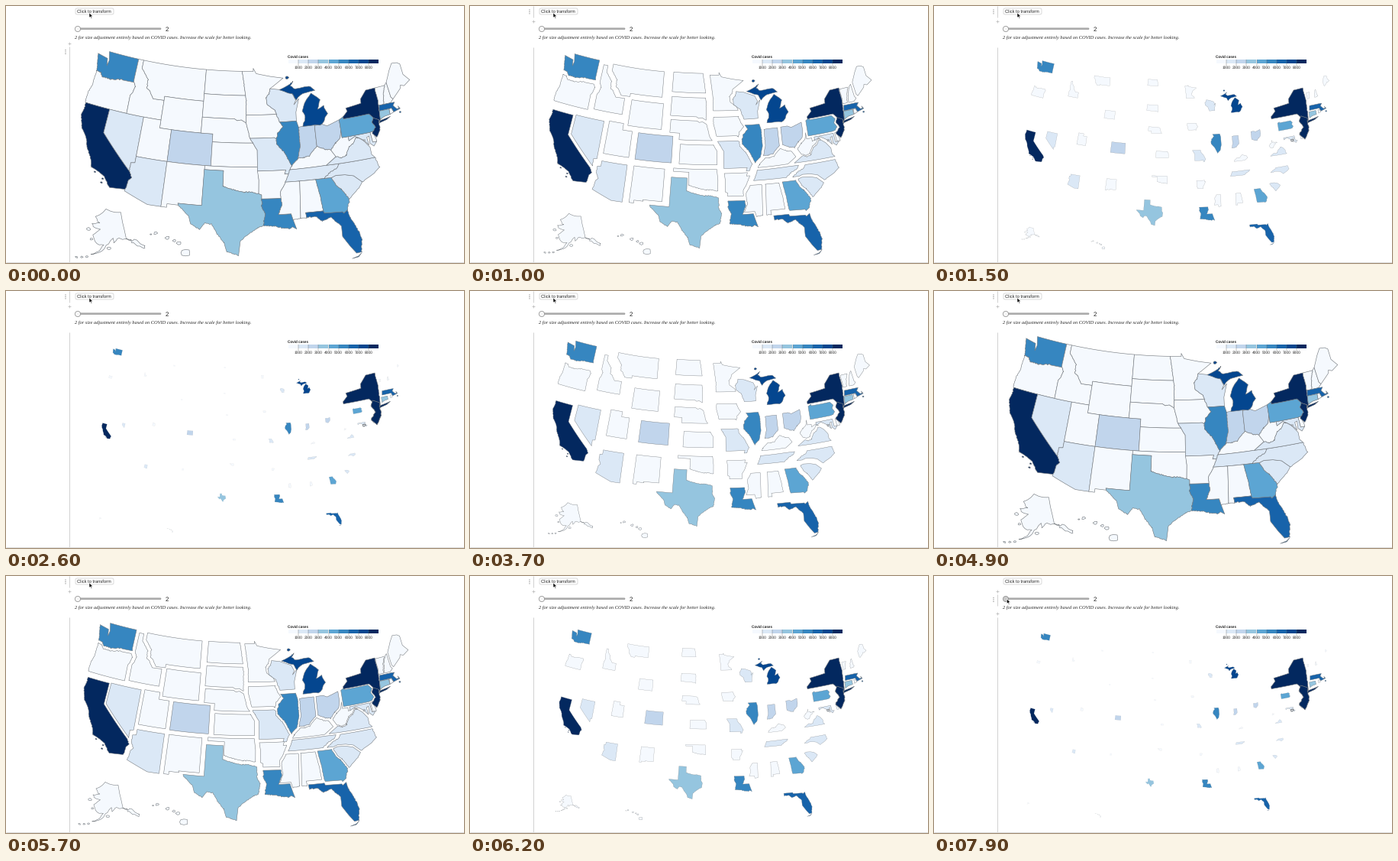
A matplotlib script for the animation above (8000 ms loop, 600 px wide and 336 px high).

```python
import numpy as np
import matplotlib.pyplot as plt
from matplotlib.animation import FuncAnimation
from matplotlib.patches import Circle, FancyBboxPatch, PathPatch, Polygon, Rectangle
from matplotlib.path import Path

W, H, DPI = 600, 336, 100
FRAMES, STEP = 80, 100
PT = 72 / DPI
BLUES = ["#f5f9fe", "#dbe8f6", "#c1d5ec", "#95c5df", "#5ca5d3",
         "#3686c0", "#1763aa", "#04468f", "#03285f"]
rng = np.random.default_rng(4)

plt.rcParams["text.hinting"] = "none"
fig = plt.figure(figsize=(W / DPI, H / DPI), dpi=DPI, facecolor="white")
ax = fig.add_axes([0, 0, 1, 1])
ax.set_xlim(0, W)
ax.set_ylim(H, 0)
ax.axis("off")


def albers(lon0, p1, p2, k, ref, at):
    """Equal-area conic in degrees west / north; ref lands on pixel at."""
    s1, s2 = np.sin(np.radians([p1, p2]))
    n = (s1 + s2) / 2
    c = 1 - s1 * s1 + 2 * n * s1

    def raw(pts):
        west, north = np.asarray(pts, float).T
        rho = np.sqrt(c - 2 * n * np.sin(np.radians(north))) / n
        theta = n * np.radians(lon0 - west)
        return k * np.column_stack([rho * np.sin(theta), rho * np.cos(theta)])

    shift = np.array(at) - raw([ref])[0]
    return lambda pts: raw(pts) + shift


K = 596
MAIN = albers(96, 29.5, 45.5, K, (96.6, 38.7), (313.2, 192.8))
ALASKA = albers(154, 55, 65, 0.35 * K, (156, 58.5), (130.2, 312.6))
HAWAII = albers(157, 8, 18, K, (160, 19.9), (191, 319.2))


# Outline helpers: all points are degrees west, degrees north
LON, LAT = 0, 1


def border(axis, *nums, rough=0.04):
    """A ragged line that runs along one axis; call it to cut out a stretch."""
    p = np.reshape(nums, (-1, 2))
    p = p[p[:, axis].argsort()]
    key, val = p[:, axis], p[:, 1 - axis]
    grid = np.union1d(key, np.arange(key[0], key[-1], 0.15))
    vals = np.interp(grid, key, val) + rng.normal(0, rough, len(grid))

    def cut(a, b):
        lo, hi = min(a, b), max(a, b)
        k = np.concatenate([[lo], grid[(grid > lo) & (grid < hi)], [hi]])
        pts = np.empty((len(k), 2))
        pts[:, axis], pts[:, 1 - axis] = k, np.interp(k, grid, vals)
        return pts if a <= b else pts[::-1]

    return cut


def ring(*parts):
    """Close a ring, with long edges split so that they follow the parallels."""
    p = np.vstack([np.reshape(part, (-1, 2)) for part in parts])
    out = []
    for a, b in zip(p, np.roll(p, -1, axis=0)):
        n = 1 + int(np.hypot(*(b - a)) / 1.2)
        out.append(a + (b - a) * np.arange(n)[:, None] / n)
    return np.vstack(out + [p[:1]])


def coast(*nums, rough=0.06):
    p = np.reshape(nums, (-1, 2))
    f = np.arange(3)[:, None] / 3
    pts = np.vstack([a + (b - a) * f for a, b in zip(p, np.roll(p, -1, axis=0))])
    return ring(pts + rng.normal(0, rough, pts.shape))


def box(west, east, north, south):
    return ring((west, north, east, north, east, south, west, south))


def island(west, north, r):
    a = np.radians(np.arange(0, 360, 45))
    size = r * rng.uniform(0.7, 1.2, len(a))
    return ring(np.column_stack([west + size * np.cos(a) / np.cos(np.radians(north)),
                                 north + 0.7 * size * np.sin(a)]))


states = []


def state(cases, *rings, proj=MAIN, at=None):
    """Add a region; thousands of cases set its colour and, per area, its shrunk size."""
    loops = [proj(r) for r in rings]
    area = sum(abs(np.sum(x[:-1] * y[1:] - x[1:] * y[:-1])) / 2 for x, y in (v.T for v in loops))
    codes = []
    for v in loops:
        codes += [Path.MOVETO] + [Path.LINETO] * (len(v) - 2) + [Path.CLOSEPOLY]
    verts = np.vstack(loops)
    mid = np.array(at) if at else (verts.min(0) + verts.max(0)) / 2
    patch = PathPatch(Path(verts, codes), fc=BLUES[min(int(cases), 8)], ec="#74797e",
                      joinstyle="round")
    ax.add_patch(patch)
    states.append((patch, verts, codes, mid, cases / area))
    return cases / area


# Coasts, rivers and ridges shared by neighbours
PACIFIC = border(LAT, 117.12, 32.53, 118.3, 33.75, 119.1, 34.1, 120.55, 34.5, 120.9, 35.4,
                 121.9, 36.6, 122.5, 37.8, 123.7, 38.95, 124.35, 40.4, 124.15, 41.5,
                 124.45, 42.8, 124.05, 44.5, 124.0, 46.25, 124.7, 48.38)
ATLANTIC = border(LAT, 80.4, 25.2, 80.03, 26.8, 80.55, 28.4, 81.3, 29.9, 81.45, 30.72,
                  80.9, 32.05, 79.2, 33.2, 78.55, 33.86, 76.6, 34.6, 75.5, 35.25,
                  75.87, 36.55, 75.05, 38.45, 74.85, 39, 74.1, 39.75, 74, 40.5)
GULF = border(LON, 97.4, 26, 97.2, 27.7, 96.4, 28.4, 94.7, 29.4, 93.8, 29.7, 92.3, 29.55,
              90.2, 29.1, 89.6, 29.4, 89.5, 30.2, 88.4, 30.35, 86.2, 30.4, 85.3, 29.7,
              84, 30.1, 83, 29.15)
RIO_GRANDE = border(LON, 106.55, 31.8, 104.9, 30.6, 104.4, 29.6, 103.15, 29, 102.4, 29.85,
                    101.4, 29.77, 100.3, 28.3, 99.5, 27.5, 99.1, 26.4, 97.4, 25.87)
RED = border(LON, 100, 34.56, 98.1, 34.13, 96.6, 33.85, 95.5, 33.9, 94.04, 33.55)
SABINE = border(LAT, 94.04, 33.02, 94.04, 32, 93.55, 31.2, 93.85, 29.7)
MISSISSIPPI = border(LAT, 92.1, 46.75, 92.3, 46.1, 92.87, 45.6, 92.75, 44.75, 91.3, 44,
                     91.2, 43.5, 90.65, 42.5, 90.15, 41.9, 91.05, 41.2, 91.42, 40.4,
                     91.4, 39.8, 90.2, 38.7, 89.15, 37, 89.5, 36.5, 90.25, 35,
                     91.1, 33.9, 91.15, 33, 91, 32.3, 91.6, 31)
OHIO = border(LON, 89.15, 37, 88.05, 37.85, 87.1, 37.85, 86.2, 38, 85.4, 38.7, 84.82, 39.1,
              83.7, 38.65, 82.6, 38.4, 81.7, 39.2, 80.85, 39.7, 80.52, 40.64)
WABASH = border(LAT, 87.53, 41.7, 87.53, 39.3, 88.05, 37.85, rough=0.02)
PLAINS = border(LAT, 97.23, 49, 96.8, 47, 96.45, 45.3, 96.45, 42.5, 95.8, 40.58, 95.3, 40,
                94.6, 39.1, rough=0.02)
COLUMBIA = border(LON, 124.05, 46.25, 123.2, 46.15, 122.8, 45.7, 121.2, 45.67, 119, 46)
SNAKE = border(LAT, 116.92, 46, 116.5, 45.5, 117.03, 44.3)
BITTERROOT = border(LAT, 116.05, 48, 114.5, 46.7, 114.45, 45.6, 113.9, 45.4, 113, 44.45)
COLORADO = border(LAT, 114.7, 36.1, 114.63, 35, 114.1, 34.3, 114.5, 33.9, 114.72, 32.72)
BLUE_RIDGE = border(LON, 81.97, 37.53, 81.2, 37.25, 80.3, 37.5, 79.6, 38.5, 78.9, 38.8,
                    78.35, 39.4, 77.75, 39.3)
SMOKIES = border(LON, 84.3, 35, 83.1, 35.75, 82, 36.1, 81.68, 36.59)
SAVANNAH = border(LAT, 83.1, 35, 82.6, 34, 81.9, 33.4, 80.9, 32.05)
CHATTAHOOCHEE = border(LAT, 85.6, 35, 85.18, 32.87, 85, 31, rough=0.01)
DELAWARE = border(LAT, 75.35, 42, 74.7, 41.36, 75.1, 40.9, 74.75, 40.2, 75.5, 39.6,
                  74.9, 38.95)
HUDSON = border(LAT, 73.35, 45, 73.3, 43.6, 73.5, 42.05, 73.65, 41, rough=0.02)
CONNECTICUT = border(LAT, 71.5, 45, 72.05, 44.1, 72.45, 42.73)

# West
state(5.6, ring(PACIFIC(46.25, 48.38), (123.1, 48.15, 122.75, 48.1, 122.5, 47.2, 122.35, 47.9),
                (122.75, 49, 117.03, 49, 117.04, 46.4, 116.92, 46), COLUMBIA(119, 124.05)))
state(0.8, ring(COLUMBIA(124.05, 119), SNAKE(46, 44.3), (117.03, 42), PACIFIC(42, 46.25)))
state(8.4, ring((120, 42, 120, 39), COLORADO(35, 32.72), PACIFIC(32.53, 42)),
      island(119.8, 34, 0.12), island(118.4, 33.4, 0.12), island(118.45, 32.9, 0.12))
state(1.1, ring((120, 42, 114.04, 42, 114.04, 36.2), COLORADO(36.1, 35), (120, 39)))
state(0.5, ring((117.03, 49, 116.05, 49), BITTERROOT(48, 44.45),
                (111.05, 44.5, 111.05, 42, 117.03, 42), SNAKE(44.3, 46), (117.04, 46.4)))
state(0.2, ring((116.05, 49, 104.05, 49, 104.05, 45, 111.05, 45, 111.05, 44.5),
                BITTERROOT(44.45, 48)))
state(0.15, box(111.05, 104.05, 45, 41))
state(0.8, ring((114.04, 42, 111.05, 42, 111.05, 41, 109.05, 41, 109.05, 37, 114.04, 37)))
state(2.9, box(109.05, 102.05, 41, 37))
state(1.2, ring((114.04, 37, 109.05, 37, 109.05, 31.33, 111.07, 31.33, 114.8, 32.5),
                COLORADO(32.72, 36.1), (114.04, 36.2)))
state(0.3, ring((109.05, 37, 103, 37, 103.05, 32, 106.6, 32, 106.5, 31.78),
                (108.2, 31.78, 108.2, 31.33, 109.05, 31.33)))
# Plains
state(0.15, ring((104.05, 45.94, 104.05, 49), PLAINS(49, 45.94)))
state(0.15, ring((104.05, 45.94), PLAINS(45.94, 42.5),
                 (97.3, 42.87, 98, 42.77, 98.5, 43, 104.05, 43)))
state(0.2, ring((104.05, 43, 98.5, 43, 98, 42.77, 97.3, 42.87), PLAINS(42.5, 40),
                (102.05, 40, 102.05, 41, 104.05, 41)))
state(0.4, ring((102.05, 40), PLAINS(40, 39.1), (94.62, 37, 102.05, 37)))
state(0.6, ring((103, 37, 94.62, 37, 94.43, 35.4), RED(94.48, 100), (100, 36.5, 103, 36.5)))
state(3.7, ring((103.04, 36.5, 100, 36.5), RED(100, 94.04), SABINE(33.02, 29.7),
                GULF(93.85, 97.4), RIO_GRANDE(97.4, 106.55), (106.6, 32, 103.05, 32)))
state(0.6, ring(PLAINS(43.5, 49), (95.15, 49, 95.15, 49.38, 94.6, 48.7, 92, 48.3, 89.6, 48),
                MISSISSIPPI(46.75, 43.5)))
state(0.5, ring(MISSISSIPPI(43.5, 40.4), (91.73, 40.6), PLAINS(40.58, 43.5)))
state(1.5, ring(MISSISSIPPI(40.4, 36), (90.37, 36, 90.15, 36.5, 94.62, 36.5),
                PLAINS(39.1, 40.58), (91.73, 40.6)))
state(0.5, ring((94.62, 36.5, 90.15, 36.5, 90.37, 36), MISSISSIPPI(36, 33), (94.04, 33.02),
                RED(94.04, 94.48), (94.43, 35.4)))
state(5.9, ring((94.04, 33.02), MISSISSIPPI(33, 31), (89.75, 31, 89.5, 30.2, 89.1, 29.05),
                GULF(89.65, 93.85), SABINE(29.7, 33.02)))
# Great Lakes
state(1.5, ring(MISSISSIPPI(42.5, 46.75), (90.4, 46.57, 88.1, 45.9, 87.6, 45.1, 88, 44.55),
                (87.05, 45.25, 87.75, 43.6, 87.8, 42.5)))
state(6 - 0.1, ring((90.65, 42.5, 87.8, 42.5), WABASH(41.7, 37.85), OHIO(88.05, 89.15),
                    MISSISSIPPI(37, 42.5)))
state(2.2, ring((87.53, 41.7, 86.8, 41.76, 84.8, 41.76), OHIO(84.82, 88.05),
                WABASH(37.85, 41.7)))
state(2.2, ring((84.8, 41.7, 83.45, 41.73, 82.7, 41.45, 80.52, 41.98), OHIO(80.52, 84.82)))
state(7.6, coast(84.8, 41.76, 83.45, 41.73, 82.45, 43, 82.8, 44.05, 83.9, 43.65, 83.3, 44.8,
                 84.7, 45.75, 86.1, 44.7, 86.5, 43.6, 86.25, 42.9, 86.8, 41.76, rough=0.04),
      coast(90.4, 46.57, 88.4, 47.2, 87.8, 47.45, 88.4, 46.9, 87.5, 46.5, 85, 46.75,
            84, 46.1, 86.3, 45.9, 87.5, 45.2, 88.1, 45.9, rough=0.04),
      island(88.85, 48, 0.25))
# South
state(0.5, ring(MISSISSIPPI(36.5, 37), OHIO(89.15, 82.6), (81.97, 37.53, 83.68, 36.6)))
state(1.9, ring((89.5, 36.5, 83.68, 36.6), SMOKIES(81.68, 84.3), MISSISSIPPI(35, 36.5)))
state(0.9, ring(MISSISSIPPI(35, 31), (89.75, 31), GULF(89.5, 88.4), (88.1, 34.9, 88.2, 35)))
state(0.9, ring((88.2, 35), CHATTAHOOCHEE(35, 31), (87.6, 31), GULF(87.5, 88.4), (88.1, 34.9)))
state(4.4, ring((85.6, 35), SAVANNAH(35, 32.05), ATLANTIC(32.05, 30.72),
                (82.05, 30.36, 82.2, 30.57, 84.86, 30.7), CHATTAHOOCHEE(31, 35)))
state(6.7, ring((87.6, 31, 85, 31, 84.86, 30.7, 82.2, 30.57, 82.05, 30.36),
                ATLANTIC(30.72, 25.2), (81.1, 25.15, 81.8, 26.1, 82.7, 27.5, 82.65, 28.8),
                GULF(83, 87.5)),
      ring((80.4, 25.1, 80.9, 24.75, 81.8, 24.55, 80.9, 24.65)))
state(1.1, ring((83.1, 35, 82.4, 35.2, 81, 35.1, 79.7, 34.8), ATLANTIC(33.86, 32.05),
                SAVANNAH(32.05, 35)))
state(1.4, ring(SMOKIES(84.3, 81.68), ATLANTIC(36.55, 33.86),
                (79.7, 34.8, 81, 35.1, 82.4, 35.2, 83.1, 35)))
state(1.3, ring((83.68, 36.6), BLUE_RIDGE(81.97, 77.75),
                (77.05, 38.8, 76.3, 37.9, 76.3, 37, 75.87, 36.55)))
state(0.2, ring(OHIO(82.6, 80.52), (80.52, 39.72, 79.48, 39.72, 79.48, 39.2, 78.4, 39.6),
                BLUE_RIDGE(77.75, 81.97)))
state(1.7, ring((79.48, 39.72, 75.79, 39.72, 75.7, 38.46, 75.05, 38.45, 75.65, 37.95),
                (76.2, 38.4, 76.1, 39.3, 76.5, 39.2, 76.4, 38.2, 77.05, 38.9),
                (77.75, 39.3, 78.4, 39.6, 79.48, 39.2)))
state(0.3, ring((75.79, 39.72, 75.4, 39.8, 75.05, 38.75, 75.05, 38.45, 75.7, 38.46)))
# Northeast
state(4.9, ring((80.52, 41.98, 79.76, 42.27, 79.76, 42), DELAWARE(42, 39.8),
                (75.79, 39.72, 80.52, 39.72)))
NEW_YORK = state(75.8, ring((79.76, 42, 79.76, 42.27, 78.9, 42.85, 79.05, 43.27, 76.3, 43.5),
                            (76.2, 44.05, 75, 44.98), HUDSON(45, 41),
                            (73.95, 40.7, 73.9, 41), DELAWARE(41.36, 42)),
                 ring((74, 40.6, 73.7, 40.87, 72.6, 40.98, 71.9, 41.07, 72.6, 40.8)))
state(18.7, ring(DELAWARE(41.36, 38.95), ATLANTIC(39, 40.5), (74.05, 40.65, 73.9, 41)))
state(0.3, ring(HUDSON(42.75, 45), CONNECTICUT(45, 42.73)))
state(0.4, ring(CONNECTICUT(42.73, 45), (71.1, 45.3, 70.98, 43.4, 70.7, 43.08, 71.3, 42.7)))
state(0.3, ring((71.1, 45.3, 70, 46.7, 69.25, 47.45, 68.3, 47.35, 67.8, 47.07, 67.8, 45.7),
                (66.95, 44.8, 68.2, 44.3, 68.8, 44.5, 69, 44.1, 70.7, 43.08, 70.98, 43.4)))
state(6.6, ring((73.5, 42.05, 73.27, 42.75, 71.3, 42.7, 70.6, 42.65, 71, 42.3, 70.5, 41.77),
                (70.1, 41.78, 70.2, 42.08, 69.95, 41.7, 71.15, 41.5, 71.38, 42.02)),
      island(70.1, 41.28, 0.12))
state(0.5, ring((71.8, 42.01, 71.38, 42.02, 71.15, 41.5, 71.85, 41.32)))
state(3.1, ring((73.5, 42.05, 71.8, 42.01, 71.85, 41.32, 72.9, 41.25, 73.65, 41)))
state(0.5, island(77.02, 38.9, 0.12))
# Alaska and Hawaii
state(0.13, coast(141, 69.65, 141, 60.3, 137.5, 58.9, 135.5, 59.6, 130, 55.9, 131, 55,
                  136.5, 58.1, 139, 59.5, 146, 60.8, 150, 59.5, 150.5, 61.2, 153.8, 59.2,
                  158, 56.4, 164.8, 54.5, 160, 56.2, 157.2, 58.6, 162, 58.7, 166, 61.6,
                  161, 64, 166.2, 64.5, 168, 65.6, 161.9, 66.4, 166.4, 68.3, 156.6, 71.3,
                  rough=0.2),
      island(153.4, 57.4, 0.8), island(170.2, 63.4, 0.7), island(166.4, 60.1, 0.5),
      *[island(167 + 3 * i, 53.6 - 0.5 * i, 0.45) for i in range(3)],
      proj=ALASKA, at=(123, 297))
state(0.22, island(155.5, 19.6, 0.65), island(156.4, 20.8, 0.3), island(157, 21.12, 0.2),
      island(157.95, 21.47, 0.28), island(159.53, 22.05, 0.23), island(160.15, 21.9, 0.1),
      proj=HAWAII, at=(215, 313))


def label(x, y, s, px, ha="left", family="Liberation Sans", color="#222", **kw):
    return ax.text(x, y, s, fontsize=px * PT, ha=ha, va="baseline",
                   family=family, color=color, **kw)


def line(x, y, color, px):
    return ax.plot(x, y, color=color, lw=px * PT, solid_capstyle="butt")[0]


# Legend
label(369, 67.8, "Covid cases", 4.65, weight="bold")
BLOCK = 13.2
for i, color in enumerate(BLUES):
    x = 369.7 + i * BLOCK
    ax.add_patch(Rectangle((x, 70.4), BLOCK, 5, fc=color, lw=0))
    if i:
        line([x, x], [70.4, 78], "#666", 0.4)
        label(x, 82.3, f"{i}000", 4.9, ha="center")

# Controls
ax.add_patch(FancyBboxPatch((91, 3), 50, 8, boxstyle="round,pad=0,rounding_size=2",
                            fc="white", ec="#c4c4c4", lw=0.6 * PT))
label(115.7, 9, "Click to transform", 5.8, ha="center")
ax.add_patch(FancyBboxPatch((92, 28.9), 111, 1.6, boxstyle="round,pad=0,rounding_size=0.8",
                            fc="#b5b5b5", ec="#8a8a8a", lw=0.6 * PT))
thumb = ax.add_patch(Circle((94, 30), 3.6, ec="#888", lw=0.7 * PT, zorder=4))
label(208.7, 33, "2", 8)
label(89.7, 42.7, "2 for size adjustment entirely based on COVID cases. "
      "Increase the scale for better looking.", 6.38, family="Liberation Serif", style="italic")

# Notebook margin
MARGIN = 82.5
line([MARGIN] * 2, [54, H], "#d2d2d2", 1)
line([0, W], [335.3, 335.3], "#dcdcdc", 1)
hover = line([MARGIN] * 2, [0, 0], "#d2d2d2", 1)


def plus(y):
    return [line([80.8, 85.2], [y, y], "#aaa", 0.6), line([83, 83], [y - 2.2, y + 2.2], "#aaa", 0.6)]


plus_top, plus_low = plus(20), plus(49)
dots = [ax.add_patch(Circle((78, 0), 0.6, fc="#777", lw=0)) for _ in range(3)]

ARROW = np.array([(0, 0), (0, 6.6), (1.6, 5.2), (2.7, 7.6), (3.7, 7.2), (2.6, 4.8), (4.8, 4.7)])
cursor = ax.add_patch(Polygon(ARROW, fc="black", ec="white", lw=0.6 * PT, zorder=6))


def ease(t, start, length=2000):
    u = np.clip((t - start) / length, 0, 1)
    return 4 * u ** 3 if u < 0.5 else 1 - 4 * (1 - u) ** 3


def draw(frame):
    t = frame * STEP
    shrunk = ease(t, 270) - ease(t, 2605) + ease(t, 5060)
    for patch, verts, codes, mid, density in states:
        s = 1 + (np.sqrt(density / NEW_YORK) - 1) * shrunk
        patch.set_path(Path(mid + (verts - mid) * s, codes))
        patch.set_linewidth(0.6 * PT * s)

    m = ease(t, 7300, 400)
    cursor.set_xy(ARROW + np.array([109, 8.8]) + m * np.array([-13.7, 21]))
    on_slider, on_map = t >= 7500, t < 100
    thumb.set_facecolor("#c9c9c9" if on_slider else "#f6f6f6")
    for p in plus_top:
        p.set_visible(not on_map)
    for p in plus_low:
        p.set_visible(on_map or on_slider)
    y = 60 if on_map else 31 if on_slider else 7.5
    hover.set_ydata([y - 7.5, y + 7.5])
    for i, dot in enumerate(dots):
        dot.center = (78, y + (i - 1) * 2.4)


anim = FuncAnimation(fig, draw, frames=FRAMES, interval=STEP, repeat=True, repeat_delay=0)
plt.show()
```
